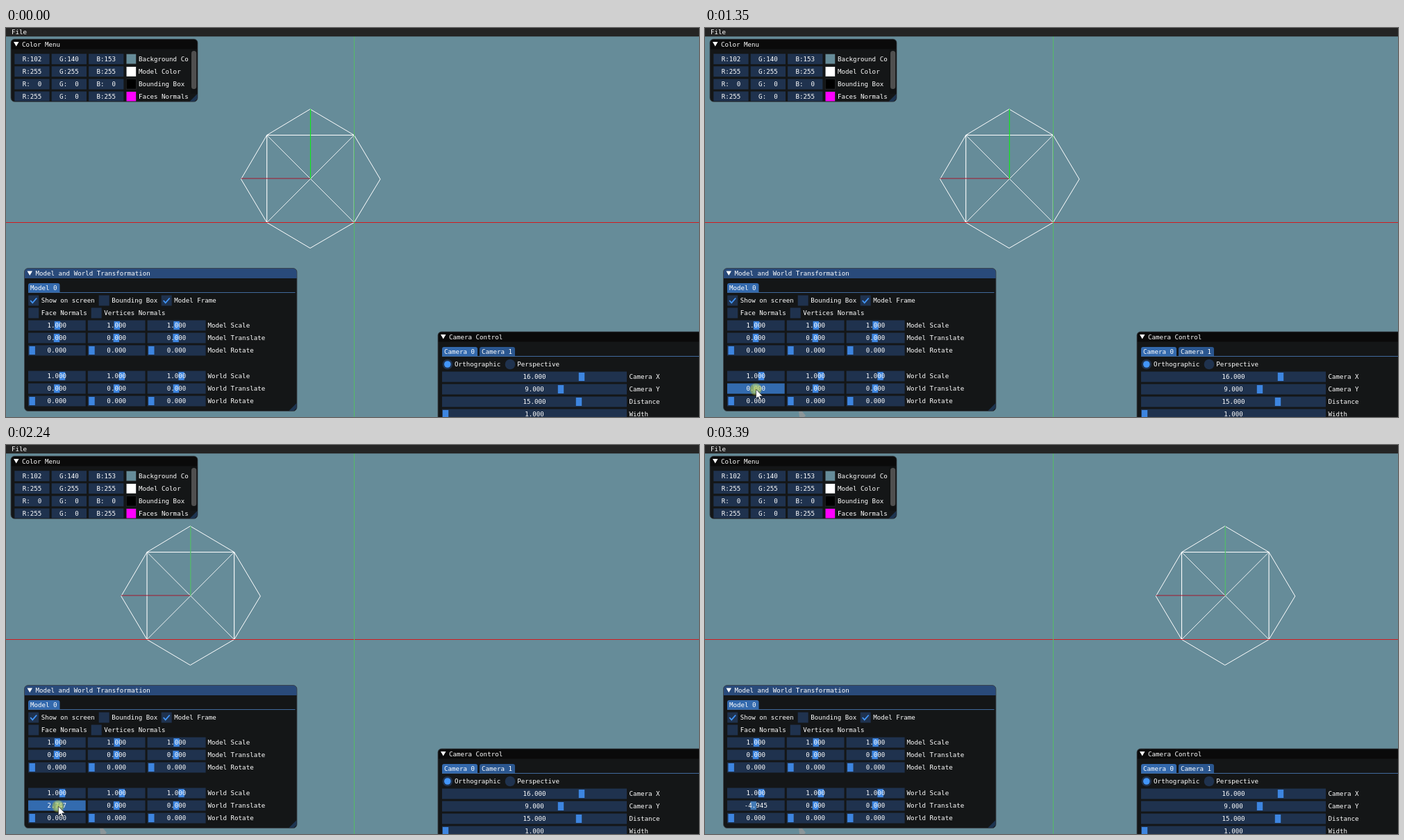
An HTML page with a canvas that plays this animation: 998x561 px, repeating every 4470 ms.

```html
<!DOCTYPE html>
<html lang="en">
<head>
<meta charset="utf-8">
<title>Model viewer</title>
<style>
html, body { margin: 0; width: 100%; height: 100%; overflow: hidden; background: #668c99; }
canvas { display: block; }
</style>
</head>
<body>
<canvas id="stage" width="998" height="561"></canvas>
<script>
const ctx = document.getElementById('stage').getContext('2d');
const LOOP = 4470;
const FRAME = '#1f324e', GRAB = '#3d85e0', BRIGHT = '#4296fa', TAB = '#3369ad';
const UNIT = 100 / 182;   // slider value per mouse step

// [time, slider step] while dragging; the value holds until the next entry
const drag = [
  [0, 0], [1150, -1], [1350, 0], [1420, 1], [1490, 2], [1560, 4], [1630, 5], [1700, 8], [1770, 11],
  [1970, 10], [2040, 9], [2110, 7], [2180, 5], [2250, 2], [2320, 0], [2390, -3], [2460, -7], [2520, -9]
];
const stepAt = t => drag.findLast(d => d[0] <= t)[1];

function box(x, y, w, h, color, r = 0) {
  ctx.fillStyle = color;
  ctx.beginPath();
  ctx.roundRect(x, y, w, h, r);
  ctx.fill();
}

function shape(points, color, x = 0, y = 0) {
  ctx.fillStyle = color;
  ctx.beginPath();
  for (const [px, py] of points) ctx.lineTo(x + px, y + py);
  ctx.closePath();
  ctx.fill();
}

function line(color, width, ...points) {
  ctx.strokeStyle = color;
  ctx.lineWidth = width;
  ctx.beginPath();
  for (const [x, y] of points) ctx.lineTo(x, y);
  ctx.stroke();
}

function disc(x, y, r, color) {
  ctx.fillStyle = color;
  ctx.beginPath();
  ctx.arc(x, y, r, 0, 7);
  ctx.fill();
}

function text(s, x, y, align = 'left') {
  ctx.fillStyle = '#fff';
  ctx.textAlign = align;
  ctx.fillText(s, x, y + 3);
}

function panel(x, y, w, h, title, titleColor) {
  box(x, y, w, h, '#141617', 5.5);
  box(x, y, w, 14.5, titleColor, [5.5, 5.5, 0, 0]);
  ctx.strokeStyle = '#3b434a';
  ctx.lineWidth = 0.8;
  ctx.beginPath();
  ctx.roundRect(x, y, w, h, 5.5);
  ctx.stroke();
  shape([[4, 4], [11.5, 4], [7.75, 10.5]], '#fff', x, y);
  text(title, x + 16, y + 7.5);
}

const grip = (x, y) => shape([[0, -11], [0, -4], [-4, 0], [-11, 0]], '#1d3450', x, y);

function slider(x, y, w, value, grabX, frame = FRAME, grab = GRAB) {
  box(x, y - 7.5, w, 15, frame);
  box(grabX - 4.2, y - 6, 8.4, 12, grab);
  text(value, x + w / 2, y, 'center');
}

function tab(x, w, y, label, color) {
  box(x, y, w, 13.5, color, [3, 3, 0, 0]);
  text(label, x + 3, y + 7);
}

function check(x, y, label, on) {
  box(x, y - 7.5, 15, 15, FRAME);
  if (on) line(BRIGHT, 1.8, [x + 3, y], [x + 6, y + 3.3], [x + 12, y - 3.5]);
  text(label, x + 18.5, y);
}

function radio(x, y, label, on) {
  disc(x, y, 7.3, FRAME);
  if (on) disc(x, y, 4.8, BRIGHT);
  text(label, x + 10.3, y);
}

function model(k, t) {
  const x = 438 - k * UNIT * 62.85, y = 217.5;
  const l = x - 62.3, r = x + 63.3, top = 154.5, low = 280.5;
  line('#fff', 1, [x, 117], [r, top], [x + 101, 218], [r, low], [x, 317.5], [l, low],
    [x - 99.5, 218], [l, top], [x, 117]);
  line('#fff', 1.1, [l, top], [r, top], [r, low], [l, low], [l, top]);
  line('#fff', 0.9, [l, top], [r, low]);
  line('#fff', 0.9, [l, low], [r, top]);
  line('#a3182f', 1.2, [x - 99.5, 217], [x, 217]);
  if (t >= 1970 && t < 2110) line('#10202c', 1.2, [x - 69, 217], [x, 217]);
  line(t < 1970 ? '#12e61e' : '#52bd68', 1.2, [x + 0.5, 117], [x + 0.5, y]);
}

function colorMenu() {
  panel(7, 16, 269, 90.3, 'Color Menu', '#0a0a0a');
  ctx.save();
  ctx.beginPath();
  ctx.rect(7, 30, 269, 75.6);
  ctx.clip();
  [['Background Co', 102, 140, 153], ['Model Color', 255, 255, 255],
   ['Bounding Box', 0, 0, 0], ['Faces Normals', 255, 0, 255]].forEach(([name, ...rgb], i) => {
    const y = 44.7 + i * 18.1;
    rgb.forEach((v, c) => {
      const x = 12.3 + c * 53.4;
      box(x, y - 7.5, 50.3, 15, FRAME);
      text('RGB'[c] + ':' + String(v).padStart(3), x + 25.2, y, 'center');
    });
    box(173, y - 7.5, 14.7, 15, '#2b2f31');
    box(173.6, y - 6.9, 13.5, 13.8, `rgb(${rgb})`);
    text(name, 191, y);
  });
  ctx.restore();
  box(265.5, 31, 10, 64, '#101213');
  box(267, 33, 7.2, 55, '#4f4f4f', 3.5);
  grip(275.5, 106);
}

function modelPanel(k, t) {
  panel(26.5, 346.5, 392.5, 206, 'Model and World Transformation', '#294a7a');
  tab(32, 45.5, 368, 'Model 0', TAB);
  line('#416a9c', 1, [32, 381.5], [416.5, 381.5]);
  check(32.2, 393, 'Show on screen', true);
  check(133.7, 393, 'Bounding Box', false);
  check(223.7, 393, 'Model Frame', true);
  check(32.2, 411, 'Face Normals', false);
  check(122.7, 411, 'Vertices Normals', false);

  const active = t >= 1150 && t < 3050, hover = t >= 3050 && t < 3120;
  [['Model Scale', 429, 1, 74], ['Model Translate', 447, 0, 73], ['Model Rotate', 465, 0, 37.7],
   ['World Scale', 502, 1, 81], ['World Translate', 520, 0, 73.3], ['World Rotate', 538, 0, 37.7]]
    .forEach(([name, y, value, grabX]) => {
      for (let c = 0; c < 3; c++) {
        const x = 32 + c * 85.8, live = name === 'World Translate' && c === 0;
        slider(x, y, c < 2 ? 82.7 : 84, (live ? k * UNIT : value).toFixed(3),
          grabX + c * 85.8 + (live ? k * 0.39 : 0),
          live && active ? '#336baf' : live && hover ? '#284c77' : FRAME,
          live && active ? BRIGHT : live && t >= 3120 ? '#4279b5' : GRAB);
      }
      text(name, 290.5, y);
    });
  grip(418.5, 552);
}

function cameraPanel() {
  panel(622, 438, 400, 150, 'Camera Control', '#0a0a0a');
  tab(628, 51, 460, 'Camera 0', TAB);
  tab(682, 51, 460, 'Camera 1', '#2a568f');
  line('#416a9c', 1, [628, 473.5], [998, 473.5]);
  radio(635.8, 485, 'Orthographic', true);
  radio(726, 485, 'Perspective', false);
  [['Camera X', '16.000', 829], ['Camera Y', '9.000', 799],
   ['Distance', '15.000', 825], ['Width', '1.000', 633]].forEach(([name, value, x], i) => {
    const y = 503 + i * 18;
    slider(628, y, 266, value, x);
    text(name, 897.5, y);
  });
}

function pointer(k, t) {
  if (t < 260 || t >= 3390) return;
  let x = 73.5 + k * 0.39, y = t < 1150 ? 522 : 521;
  if (t < 880) {
    const u = Math.min(1, Math.floor((t - 260) / 67) / 7), far = (1 - u) ** 2;
    x = 76 + 85 * far;
    y = 524 + 33 * far;
  } else if (t >= 2980) {
    const u = (Math.floor((t - 2980) / 69) * 69 / 410) ** 2;
    x += 175 * u;
    y += 54 * u;
  }
  if (t >= 1150 && t < 2980) {
    const glow = ctx.createRadialGradient(x - 0.5, y, 0, x - 0.5, y, 9.5);
    const rgb = t < 2320 ? '185,200,70' : '110,205,100';
    glow.addColorStop(0, `rgba(${rgb},.8)`);
    glow.addColorStop(0.75, `rgba(${rgb},.55)`);
    glow.addColorStop(1, `rgba(${rgb},0)`);
    disc(x - 0.5, y, 9.5, glow);
  }
  const arrow = [[0, 0], [0, 13.5], [3, 10.8], [5.2, 15.5], [7.3, 14.5], [5.2, 10], [9.3, 10]];
  shape(arrow, '#fff', x, y);
  ctx.strokeStyle = '#1a1f26';
  ctx.lineWidth = 0.7;
  ctx.stroke();
}

function draw(now) {
  const t = now % LOOP, k = stepAt(t);
  box(0, 0, 998, 561, '#668c99');
  ctx.font = '9.16px "DejaVu Sans Mono", monospace';
  model(k, t);
  line('#d21a1e', 1, [0, 280.5], [998, 280.5]);
  line('#55bb66', 1, [501.5, 12], [501.5, 561]);
  box(0, 0, 998, 12.3, '#242424');
  text('File', 8, 5.7);
  colorMenu();
  modelPanel(k, t);
  cameraPanel();
  // faint trail left below the panel
  if (t >= 400) shape([[135, 553], [140, 553], [145, 559], [143, 561], [136, 561]], '#8c9699');
  pointer(k, t);
}

const start = performance.now();
function tick() {
  draw(performance.now() - start);
  requestAnimationFrame(tick);
}
tick();
</script>
</body>
</html>
```
